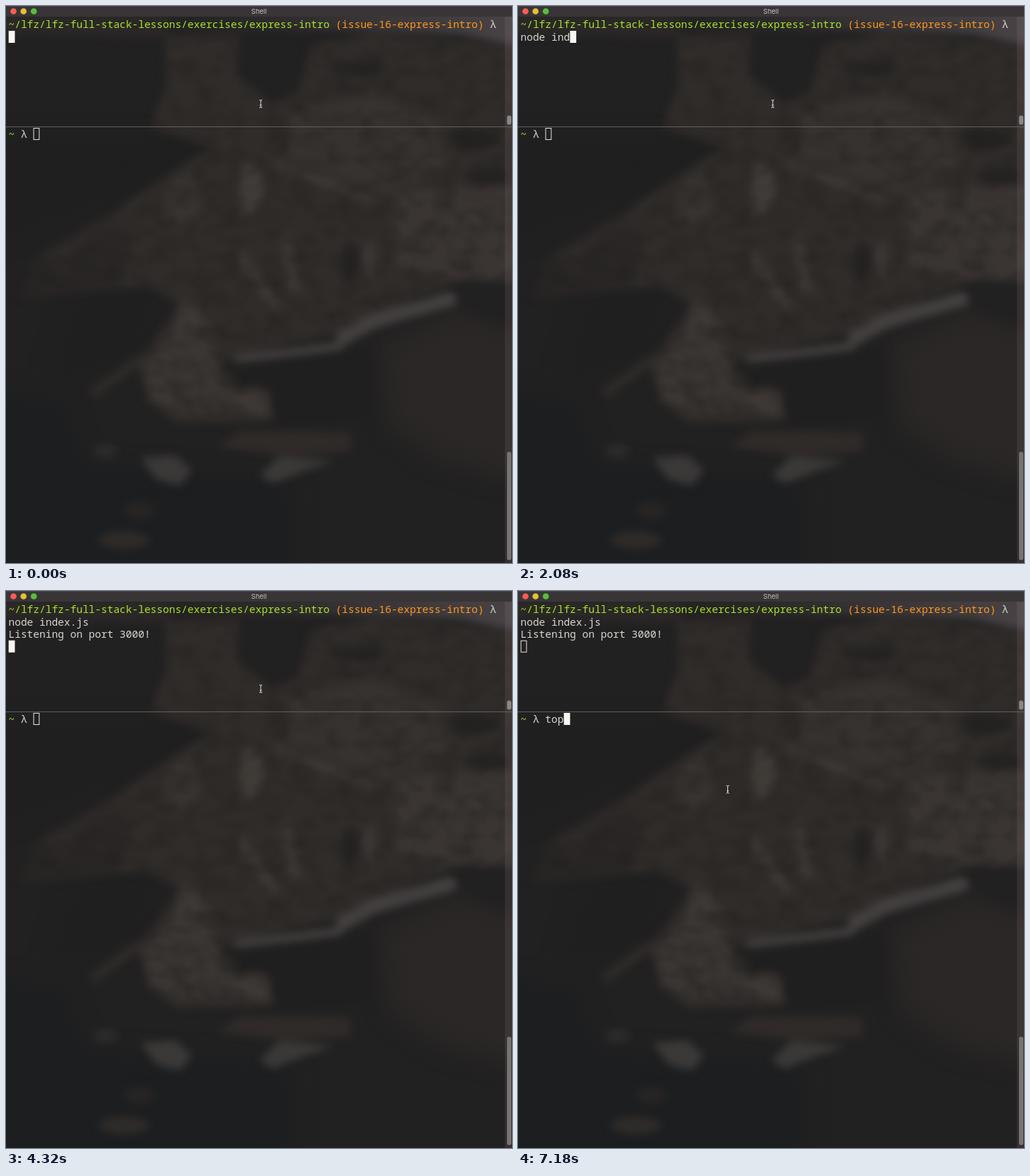
Recreate the animation shown at these times as an HTML page. Size 713 by 786 pixels, loop 8 s.

```html
<!DOCTYPE html>
<html lang="en">
<head>
<meta charset="utf-8">
<title>Shell</title>
<style>
html, body { margin: 0; width: 100%; height: 100%; overflow: hidden; background: #222121; }
svg { position: absolute; inset: 0; width: 100%; height: 100%; }
filter { color-interpolation-filters: sRGB; }
text { font: 14.5px "Noto Sans Mono", "DejaVu Sans Mono", monospace; fill: #d6d6cf; white-space: pre; }
.title { font: 9.5px Inter, Roboto, sans-serif; fill: #c4c1c1; text-anchor: middle; }
.green { fill: #a6e22e; }
.orange { fill: #fd971f; }
.block { fill: #f8f8f2; stroke: none; }
.hollow { fill: none; stroke: #e4e4de; }
</style>
</head>
<body>
<!-- Wallpaper: rocky slope in soft flat tones -->
<svg viewBox="0 0 713 786">
  <defs>
    <filter id="soft" x="-20%" y="-20%" width="140%" height="140%"><feGaussianBlur stdDeviation="6"/></filter>
    <filter id="wide" x="-30%" y="-30%" width="160%" height="160%"><feGaussianBlur stdDeviation="16"/></filter>
    <filter id="mottle" x="-5%" y="-5%" width="110%" height="110%">
      <feTurbulence type="fractalNoise" baseFrequency=".03 .04" numOctaves="2" seed="4"/>
      <feColorMatrix values="0 0 0 0 .13  0 0 0 0 .125  0 0 0 0 .12  2.4 0 0 0 -.95" result="noise"/>
      <feGaussianBlur in="SourceAlpha" stdDeviation="8"/>
      <feComposite in="noise" operator="in"/>
    </filter>
    <linearGradient id="haze">
      <stop offset=".25" stop-color="#322e2d" stop-opacity="0"/>
      <stop offset=".7" stop-color="#3a3637"/>
      <stop offset="1" stop-color="#4a4446"/>
    </linearGradient>
    <path id="rock" d="M225 42L330 38 325 95 375 138 412 120 430 55 520 35 740 60V390L640 388 560 418 465 462 325 492 300 505 378 572 372 586 240 588 200 560 185 505 245 420 200 395 120 402 20 412 45 350 150 292 240 230 290 200 205 172 225 110Z"/>
  </defs>
  <rect width="713" height="786" fill="#222121"/>
  <g filter="url(#wide)">
    <path fill="#1c1e20" d="M-50 545L80 560 110 650 400 670 400 830H-50Z"/>
    <path fill="#1f1f1f" d="M-50 190L260 190 285 205 150 270 -50 340ZM100 420L220 410 170 490 60 530Z"/>
    <path fill="#2a2726" d="M525 480L640 425 760 470V680L610 640 540 590Z"/>
  </g>
  <g filter="url(#soft)">
    <path fill="#2b2827" d="M-20 10H230V45L-20 38Z"/>
    <use href="#rock" fill="#302c2a"/>
    <path fill="#292625" d="M20 410L45 350 140 300 180 330 160 395Z"/>
    <path fill="#3a3533" d="M550 262L740 250V388L640 384 548 365Z"/>
    <path fill="#363230" d="M400 150L520 125 610 165 620 230 540 265 400 215Z"/>
    <path fill="#3a3633" d="M250 415L288 450 302 535 372 560 374 584 330 570 245 575 205 555 190 505 235 470Z"/>
    <path fill="#302b29" d="M330 600L485 602 486 628 400 634 300 622Z"/>
    <path fill="#201f1f" d="M335 510L515 482 515 582 392 592 370 555 320 535Z"/>
    <path fill="#222121" d="M330 48L400 45 408 105 378 134 335 100ZM645 392L740 400V455L650 430Z"/>
    <g fill="#252322">
      <ellipse cx="495" cy="88" rx="42" ry="12"/>
      <ellipse cx="660" cy="188" rx="38" ry="16"/>
      <ellipse cx="680" cy="240" rx="35" ry="14"/>
      <ellipse cx="485" cy="360" rx="13" ry="28"/>
    </g>
    <g fill="#403b37">
      <ellipse cx="345" cy="255" rx="17" ry="38"/>
      <ellipse cx="250" cy="272" rx="24" ry="34" opacity=".5"/>
      <ellipse cx="255" cy="445" rx="18" ry="32" opacity=".6"/>
      <ellipse cx="512" cy="355" rx="9" ry="25" opacity=".7"/>
      <ellipse cx="350" cy="555" rx="24" ry="17" opacity=".7"/>
    </g>
    <g fill="none" stroke="#3d3834" stroke-width="14" stroke-linecap="round">
      <path d="M385 226L510 270M330 352L378 422M390 325L408 405"/>
      <path stroke="#2f2b29" d="M125 545L195 495M60 355L155 305"/>
    </g>
    <g fill="#3b3938">
      <path d="M358 662L385 635 462 642 420 656 375 674Z"/>
      <path d="M190 638L238 634 262 655 245 677 212 668Z"/>
      <ellipse cx="140" cy="628" rx="17" ry="10" opacity=".45"/>
      <ellipse cx="166" cy="754" rx="36" ry="13" fill="#2f2b29"/>
      <ellipse cx="188" cy="712" rx="22" ry="13" fill="#272524"/>
    </g>
    <g fill="none" stroke="#444040" stroke-linecap="round">
      <path stroke-width="11" d="M325 497L400 489 470 480"/>
      <path stroke-width="20" d="M475 468L515 446 560 432 625 414"/>
    </g>
  </g>
  <use href="#rock" filter="url(#mottle)" opacity=".45"/>
  <path filter="url(#soft)" fill="url(#haze)" d="M0 -20H740V62L640 40 480 34H0Z"/>
</svg>

<svg viewBox="0 0 713 786">
  <rect x="703" y="15" width="10" height="771" fill="#a58a8c" opacity=".14"/>
  <path stroke="#615f5e" d="M0 170.5H713"/>
  <rect x="706" y="154.500" width="6" height="13" rx="3" fill="#8a8787"/>
  <rect x="706" y="629" width="6" height="153" rx="3" fill="#777474"/>
  <rect width="713" height="15" fill="#393536"/>
  <path stroke="#454142" d="M0 .5H713"/>
  <circle cx="10.500" cy="7.500" r="4.300" fill="#fc5b57"/>
  <circle cx="24.700" cy="7.500" r="4.300" fill="#e5bf3c"/>
  <circle cx="39.200" cy="7.500" r="4.300" fill="#57c038"/>
  <text class="title" x="356.500" y="11">Shell</text>

  <text x="3.500" y="31"><tspan class="green">~/lfz/lfz-full-stack-lessons/exercises/express-intro</tspan> <tspan class="orange">(issue-16-express-intro)</tspan> λ</text>
  <text id="command" x="3.500" y="48.500"></text>
  <text id="output" x="3.500" y="66"></text>
  <text x="3.500" y="185.500"><tspan class="green">~</tspan> λ <tspan id="lower"></tspan></text>
  <rect id="upperCursor"/>
  <rect id="lowerCursor"/>
  <path id="mouse" fill="none" stroke="#dededc" d="M-2 -5.500Q0 -5.500 0 -4V4Q0 5.500 -2 5.500M2 -5.500Q0 -5.500 0 -4M0 4Q0 5.500 2 5.500M-1.500 2H1.500"/>
</svg>

<script>
const LOOP = 8000, CELL = 8.7, ROW = 17.35;
const ENTER = 3690, LISTEN = 4320, MOVE = 5310, FOCUS = 6010;
const commandKeys = [990, 1100, 1200, 1460, 1640, 1820, 1900, 2080, 2260, 2530, 2710, 2890, 3160];
const lowerKeys = [7000, 7090, 7180];
const el = id => document.getElementById(id);
const typed = (word, keys, t) => word.slice(0, keys.filter(k => t >= k).length);

function setText(id, value) {
  if (el(id).textContent !== value) el(id).textContent = value;
}

function setCursor(id, col, y, active) {
  const inset = active ? 0 : .5, node = el(id);
  node.setAttribute("class", active ? "block" : "hollow");
  node.setAttribute("x", 3.7 + col * CELL + inset);
  node.setAttribute("y", y + inset);
  node.setAttribute("width", active ? 8.8 : 7.8);
  node.setAttribute("height", active ? 17 : 16);
}

const bezier = (u, a, b, c, d) =>
  (1 - u) ** 3 * a + 3 * u * (1 - u) ** 2 * b + 3 * u * u * (1 - u) * c + u ** 3 * d;

// The pointer swings right, then down and left, in six hard steps.
function mouseAt(t) {
  if (t < MOVE) return [359, 138];
  const u = Math.min(5, Math.floor((t - MOVE) / 88)) / 5;
  return [bezier(u, 360.5, 424, 424, 295.5), bezier(u, 138, 140, 255, 280)];
}

function draw(now) {
  const t = now % LOOP;
  const command = typed("node index.js", commandKeys, t);
  const lower = typed("top", lowerKeys, t);
  const row = t >= LISTEN ? 2 : t >= ENTER ? 1 : 0;
  setText("command", command);
  setText("output", t >= LISTEN ? "Listening on port 3000!" : "");
  setText("lower", lower);
  setCursor("upperCursor", row ? 0 : command.length, 35 + row * ROW, t < FOCUS);
  setCursor("lowerCursor", 4 + lower.length, 172, t >= FOCUS);
  el("mouse").setAttribute("transform", `translate(${mouseAt(t)})`);
}

const start = performance.now();
function tick() {
  draw(performance.now() - start);
  requestAnimationFrame(tick);
}
tick();
</script>
</body>
</html>
```
